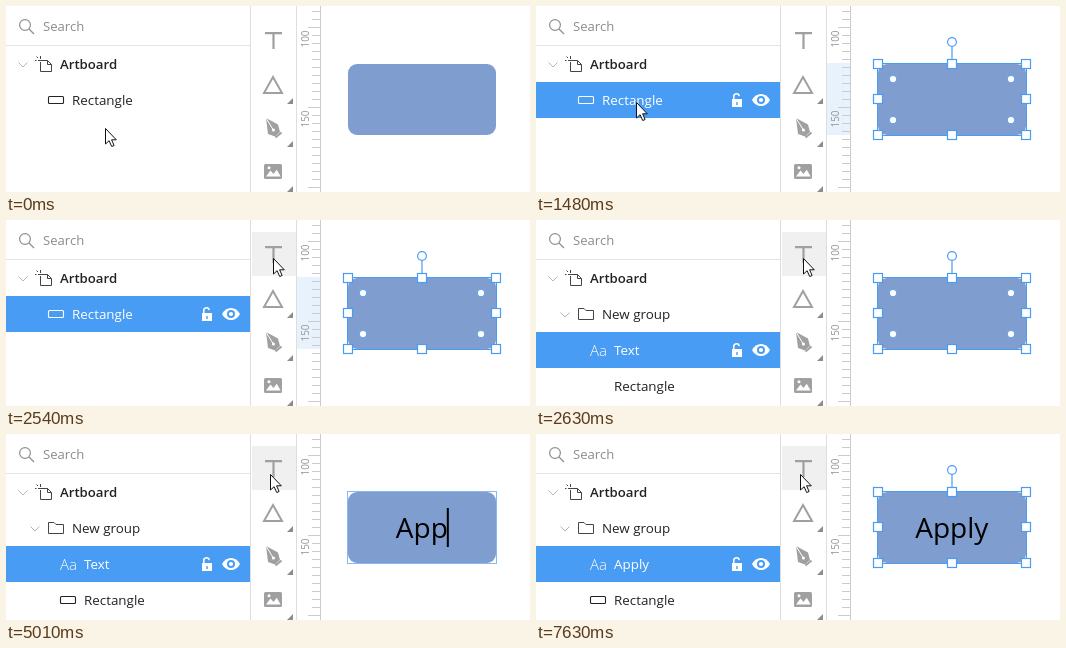
Animation of 524 by 186 pixels, one loop 7.77 s. Source, as an HTML page with a canvas:

```html
<!DOCTYPE html>
<html lang="en">
<head>
<meta charset="utf-8">
<title>Text on a rectangle</title>
<style>
  html, body { margin: 0; width: 100%; height: 100%; overflow: hidden; background: #fff; }
  canvas { display: block; width: 524px; height: 186px; }
</style>
</head>
<body>
<canvas id="stage"></canvas>
<script>
const W = 524, H = 186, LOOP = 7770;
const FONT = '"Open Sans", "Noto Sans", sans-serif';
const BLUE = '#499cf4', FILL = '#7f9ecf', INK = '#222', ICON = '#a0a0a0', HOVER = '#f0f0f0';
const BOX = { x: 342, y: 58, w: 148, h: 71 };
const TYPED = [4190, 4680, 5010, 5440, 5810];

const canvas = document.getElementById('stage');
const ratio = window.devicePixelRatio || 1;
canvas.width = Math.round(W * ratio);
canvas.height = Math.round(H * ratio);
const c = canvas.getContext('2d');

function rect(x, y, w, h, color) {
  c.fillStyle = color;
  c.fillRect(x, y, w, h);
}

function text(str, x, y, color = INK, size = 13.4, weight = 400) {
  c.font = `${weight} ${size}px ${FONT}`;
  c.fillStyle = color;
  c.fillText(str, x, y);
}

function line(d, color, width = 1) {
  c.strokeStyle = color;
  c.lineWidth = width;
  c.stroke(new Path2D(d));
}

function shape(d, color, rule = 'nonzero') {
  c.fillStyle = color;
  c.fill(new Path2D(d), rule);
}

function disc(x, y, r, fill, stroke) {
  c.beginPath();
  c.arc(x, y, r, 0, Math.PI * 2);
  if (fill) { c.fillStyle = fill; c.fill(); }
  if (stroke) { c.strokeStyle = stroke; c.lineWidth = 1.2; c.stroke(); }
}

function at(x, y, draw) {
  c.save();
  c.translate(x, y);
  draw();
  c.restore();
}

// Progress from 0 to 1 in n equal jumps, the first at time a and the last at b
function steps(t, a, b, n) {
  if (t < a) return 0;
  if (t >= b) return 1;
  return (Math.floor((t - a) / (b - a) * (n - 1)) + 1) / n;
}

const smooth = k => k * k * (3 - 2 * k);

const MOVES = [
  { a: 640, b: 810, n: 5, to: [97, 97] },
  { a: 1460, b: 2070, n: 14, to: [271, 39] },
  { a: 2250, b: 2390, n: 4, to: [267, 38] },
  { a: 2910, b: 3010, n: 3, to: [264, 40] }
];

function pointer(t) {
  let [x, y] = [99, 122];
  for (const m of MOVES) {
    const k = smooth(steps(t, m.a, m.b, m.n));
    x += (m.to[0] - x) * k;
    y += (m.to[1] - y) * k;
  }
  return [Math.round(x), Math.round(y)];
}

function chevron(x, y) {
  line(`M${x - 4.5} ${y - 2}l4.5 4.5l4.5-4.5`, '#b5b5b5');
}

function rectIcon(x, y, color) {
  c.strokeStyle = color;
  c.lineWidth = 1.1;
  c.beginPath();
  c.roundRect(x + .5, y - 3.5, 15, 7, 1);
  c.stroke();
}

function rowIcons(y) {
  at(201, y, () => {
    shape('M-5-1h10v8h-10z', '#fff');
    line('M-3.2-1v-2.3a2.7 2.7 0 0 1 5.4-.6', '#fff', 1.5);
    rect(-.7, 2, 1.4, 3, BLUE);
  });
  at(225, y, () => {
    shape('M-9 0C-5-8 5-8 9 0C5 8-5 8-9 0z', '#fff');
    disc(0, 0, 4, BLUE);
    disc(0, 0, 2.1, '#fff');
  });
}

function layers(t, py) {
  line('M0 39.5H244', '#e4e4e4');
  disc(19, 19, 5.4, null, '#8f8f8f');
  line('M23 23l5 5', '#8f8f8f', 1.2);
  text('Search', 37, 25, '#8c8c8c', 13.1);

  chevron(17, 58.5);
  line('M34.5 56V65.5H45.5V58.5L41.5 54.5H32M41.5 54.5V58.5H45.5M29 54.5h1.5M34.5 53v-3M30.5 50.5l1.5 1.5', '#444');
  text('Artboard', 54, 63, INK, 13.2, 600);

  if (t < 2590) {
    const selected = t >= 1170;
    const color = selected ? '#fff' : INK;
    if (selected) rect(0, 76, 244, 36, BLUE);
    else if (py < 112) rect(0, 76, 244, 36, HOVER);
    rectIcon(42, 94, color);
    text('Rectangle', 66, 99, color);
    if (selected) rowIcons(94);
    return;
  }

  chevron(29, 94.5);
  line('M42.5 99.5V88.5H48L50 90.5H57.5V99.5z', '#444');
  text('New group', 66, 99);
  rect(0, 112, 244, 36, BLUE);
  text('Aa', 54, 136, '#fff', 15, 300);
  text(t < 7570 ? 'Text' : 'Apply', 78, 135, '#fff');
  rowIcons(130);
  if (t >= 2690) rectIcon(54, 166, INK);
  text('Rectangle', 78, 171);
}

function tools(px, py) {
  line('M244.5 0V186M290.5 0V186', '#dedede');
  if (px >= 246 && px < 290 && py >= 12 && py < 56) rect(246, 12, 44, 44, HOVER);
  shape('M259 26h17v2.2h-7.4V43h-2.2V28.2H259z', ICON);
  line('M267 71L276 87H258z', ICON, 2);

  at(267, 122, () => {
    shape('M-7-10L5-3.5L7 4L2 8.5L-5 6z', ICON);
    line('M-7-10L0 1.5', '#fff', 1);
    disc(.4, 2, 1.6, '#fff');
    line('M2.5 9.5L8.5 4.5', ICON, 2);
  });

  c.fillStyle = ICON;
  c.beginPath();
  c.roundRect(258, 158, 18, 15, 1.5);
  c.fill();
  shape('M260 170.5l4.5-6l3 3.6l3.2-4.4l4 6.8z', '#fff');
  disc(263, 161.8, 1.5, '#fff');

  for (const y of [98, 141, 186]) shape(`M287 ${y - 6}v6h-6z`, '#8c8c8c');
}

function ruler(t) {
  if (t >= 1320 && t < 2590) rect(291, 57, 24, 72, '#e8f2fd');
  let d = 'M314.5 0V186';
  for (let y = 5; y < H; y += 8) d += `M${(y - 21) % 80 ? 306 : 302} ${y + .5}H314`;
  line(d, '#cbcbcb');
  c.textAlign = 'center';
  [[100, 33], [150, 113]].forEach(([n, y]) => at(303, y, () => {
    c.rotate(-Math.PI / 2);
    text(n, 0, 0, '#959595', 10);
  }));
  c.textAlign = 'left';
}

function frame(color) {
  c.strokeStyle = color;
  c.lineWidth = 1;
  c.strokeRect(BOX.x - .5, BOX.y - .5, BOX.w + 1, BOX.h + 1);
}

function handles(dots) {
  const { x, y, w, h } = BOX;
  frame(BLUE);
  line('M416 41V53', BLUE, 1.2);
  disc(416, 36, 4.4, '#fff', BLUE);
  for (const i of [0, .5, 1]) for (const j of [0, .5, 1]) {
    if (i === .5 && j === .5) continue;
    const hx = x + w * i - 4.5, hy = Math.floor(y + h * j) - 4.5;
    rect(hx, hy, 9, 9, '#fff');
    c.strokeStyle = BLUE;
    c.strokeRect(hx, hy, 9, 9);
  }
  if (!dots) return;
  for (const dx of [357, 475]) for (const dy of [73, 114]) disc(dx, dy, 3.7, '#fff', '#6aa6ea');
}

function caretAlpha(t) {
  if (t < 2690 || t >= 7300) return 0;
  if (t < 3940) return 1 - steps(t, 2910, 3010, 3);
  return 1;
}

function artwork(t) {
  const { x, y, w, h } = BOX;
  c.fillStyle = FILL;
  c.beginPath();
  c.roundRect(x, y, w, h, 9);
  c.fill();

  const editing = t >= 2690 && t < 7630;
  if (editing) frame('#86baf2');
  else if (t >= 1320) handles(t < 2690);

  const label = 'Apply'.slice(0, TYPED.filter(k => t >= k).length);
  c.font = `400 28px ${FONT}`;
  const width = c.measureText(label).width, mid = 415.8;
  text(label, mid - width / 2, 104, '#000', 28);
  c.globalAlpha = caretAlpha(t);
  rect(mid + width / 2 - 1, 74, 2, 39, '#000');
  c.globalAlpha = 1;
}

function click(x, y) {
  c.globalCompositeOperation = 'multiply';
  disc(x, y, 12, '#fcf24b');
  c.globalCompositeOperation = 'source-over';
}

function arrow(x, y) {
  at(x + .5, y + .5, () => {
    const d = 'M0 0V15.5L3.6 12.2L6.2 18L8.6 17L6.1 11.3H10.8z';
    shape(d, '#fff');
    line(d, '#111');
  });
}

function draw(t) {
  const [px, py] = pointer(t);
  c.setTransform(ratio, 0, 0, ratio, 0, 0);
  rect(0, 0, W, H, '#fff');
  layers(t, py);
  tools(px, py);
  ruler(t);
  artwork(t);
  if (t >= 1090 && t < 1170) click(96, 96);
  if (t >= 2300 && t < 2540) click(269, 38);
  arrow(px, py);
}

const start = performance.now();
function tick() {
  draw((performance.now() - start) % LOOP);
  requestAnimationFrame(tick);
}
tick();
</script>
</body>
</html>
```
